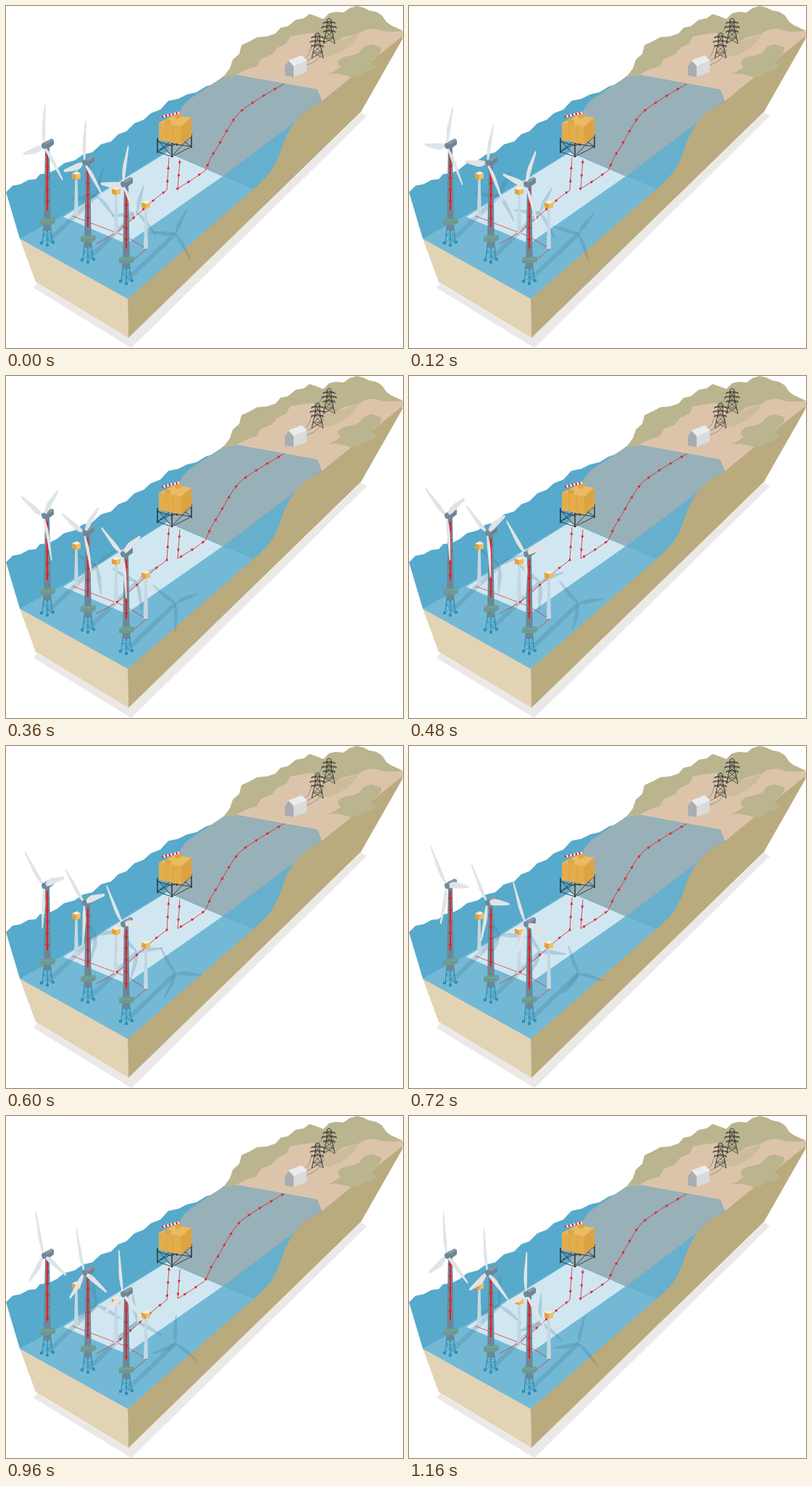
An HTML page with a canvas that plays this animation: 548x472 px, repeating every 1.2 s.

```html
<!DOCTYPE html>
<html lang="en">
<head>
<meta charset="utf-8">
<title>Offshore wind farm</title>
<style>
html, body { margin: 0; width: 100%; height: 100%; overflow: hidden; background: #fff; }
canvas { display: block; }
</style>
</head>
<body>
<canvas id="stage" width="548" height="472"></canvas>
<script>
const stage = document.getElementById('stage');
const ctx = stage.getContext('2d');
const LOOP = 1200, STEP = 120;
const RED = '#e2202c';

function fill(color, d) {
  ctx.fillStyle = color;
  ctx.fill(new Path2D(d));
}

function line(color, width, d) {
  ctx.strokeStyle = color;
  ctx.lineWidth = width;
  ctx.stroke(new Path2D(d));
}

const toPath = points => 'M' + points.join('L');

// Cables that carry moving arrows, in the direction of the current.
const cables = [
  [[152, 313], [165, 302], [188, 282], [206, 266], [222, 254], [225, 209]],
  [[240, 212], [237, 252], [258, 239], [275, 227], [284, 207], [293, 193],
   [303, 175], [314, 157], [322, 147], [332, 139], [352, 126], [384, 107]]
];

const turbines = [
  { x: 52, y: 193, lead: 2 },
  { x: 108, y: 216.5, lead: 2 },
  { x: 161, y: 246, lead: 13 }
];

// Rotor planes: the vectors to 3 o'clock and 12 o'clock.
const ROTOR = { a: [31.8, 19], b: [1, -59.5] };
const SHADOW = { a: [36, 14], b: [8, -38] };

function drawGround() {
  fill('#ebe8e8', 'M43 383L38 389L173 472L498 152L490 147L169 458Z');
  fill('#e3d3b5', 'M19 321L168 404L169 458L41 381Z');
  fill('#b9ab7e', 'M168 404L340 252L400 150L436 131L548 35L547 46L490 146L169 458Z');
}

function drawSea() {
  fill('#57aacb', 'M0 257L9 248L20 246L31 240L41 239L47 232L58 231L70 225L80 217L95 213L106 205' +
    'L119 202L131 191L145 187L155 177L166 173L177 162L190 157L200 148L213 143L224 131L238 128' +
    'L250 122L263 119L276 111L289 107L300 97L320 95L430 115L436 132' +
    'C408 143 392 166 384 186C374 214 368 230 342 252L168 404L19 321Z');
  fill('#73b9d5', 'M19 321L78 289L222 201L300 235L342 252L168 404Z');
  fill('#66b0ce', 'M300 235L395 164L406 151C390 169 383 187 379 200C370 226 362 235 342 252Z');
  fill('#98b0b7', 'M222 201L235 161Q239 139 254 128L281 110L301 97L320 95L430 115L437 131Q414 140 397 162L300 235Z');
  fill('#d0e7f1', 'M79 291L222 202L299 235L166 328Z');
}

function drawLand() {
  fill('#dcc4ab', 'M299 98L330 75L380 45L430 28L490 14L532 27L548 35V41L436 131L430 115L320 95Z');
  // Hills
  fill('#bab58e', 'M300 98L309 86L313 74L322 66L325 54L336 49L347 43L360 42L372 38L379 30L389 28L400 19' +
    'L411 17L419 11L428 14L438 18L446 10L455 8L466 9L474 3L484 0L493 2L501 6L511 8L519 13' +
    'L525 22L532 27L548 34Q526 38 511 32Q498 30 487 38L466 43L455 50L440 47L424 37L408 39' +
    'L392 42L387 52L374 58L367 67L352 73L346 83L331 88L318 95Z');
  fill('#cdbc9c', 'M440 47L455 50L487 38Q478 59 446 70L420 69Z');
  fill('#bab58e', 'M445 94Q455 90 462 84Q452 77 467 70Q478 69 488 64Q494 53 505 53L518 57' +
    'Q519 66 508 72Q499 78 512 83Q505 91 494 91Q485 99 475 98Q459 92 445 94Z');
}

function drawPylon(x, y) {
  const ink = '#2b2b2b';
  line(ink, .9, `M${x - 8} ${y + 35}L${x - 3} ${y + 13}V${y + 2}L${x} ${y}L${x + 3} ${y + 2}` +
    `V${y + 13}L${x + 8} ${y + 35}`);
  line(ink, .6, `M${x - 6} ${y + 27}L${x + 4} ${y + 19}L${x - 3} ${y + 13}L${x + 3} ${y + 4}` +
    `M${x + 6} ${y + 27}L${x - 4} ${y + 19}L${x + 3} ${y + 13}L${x - 3} ${y + 4}` +
    `M${x - 8} ${y + 35}L${x + 6} ${y + 27}H${x - 6}L${x + 8} ${y + 35}`);
  for (const [w, dy] of [[8, 6], [10, 12], [8, 18]])
    line(ink, .8, `M${x - w} ${y + dy + 2}V${y + dy}L${x} ${y + dy - 2}L${x + w} ${y + dy}v2M${x - w} ${y + dy}H${x + w}`);
}

function drawGrid() {
  line('#777', .7, 'M412 73Q420 68 422 52M414 76Q431 70 438 55M414 82Q434 76 438 60' +
    'M421 44Q432 41 438 27M438 44Q449 41 454 27M438 50Q450 47 454 34');
  drawPylon(446, 17);
  drawPylon(430, 37);
  fill('#a9adb1', 'M385 83L390 76L397 82V98L385 96Z');
  fill('#d9dbdd', 'M397 82L415 75V91L397 98Z');
  fill('#ebecee', 'M390 75L408 68L416 75L397 83Z');
}

function drawPlatform() {
  const steel = '#2d3338';
  line(steel, 1.5, 'M209 182V203M229 189V209M256 177V196M236 178V193');
  line(steel, .9, 'M209 185L229 207M229 190L209 201M229 190L256 194M256 179L229 207' +
    'M209 201L229 208L256 194M209 187L229 193L256 181M236 180L209 201M236 180L256 194');
  fill('#e4ad4c', 'M211 161L242 166V191L211 185Z');
  fill('#dca340', 'M242 166L256 154V180L242 191Z');
  fill('#ecba60', 'M211 161L232 151L256 154L242 166Z');
  fill('#dea643', 'M219 162v-4l4 -2l5 2v4l-4 2ZM233 154v-6l4 -2l4 2v6l-4 2Z');
  line('#d39a39', .6, 'M221 163V187M231 165V189');
  line('#fff', 3, 'M215 153L240 147');
  ctx.setLineDash([2.5, 2.5]);
  line(RED, 3, 'M215 153L240 147');
  ctx.setLineDash([]);
}

function drawBuoy(x, y, foot) {
  fill('#c4d8e1', `M${x - 1.5} ${y}H${x + 1.5}L${x + 3} ${foot}H${x - 3}Z`);
  fill('#e3a13a', `M${x - 6} ${y - 2}L${x} ${y}V${y + 7}L${x - 6} ${y + 5}Z`);
  fill('#efbd62', `M${x} ${y}L${x + 6} ${y - 2}V${y + 5}L${x} ${y + 7}Z`);
  fill('#f8edd4', `M${x - 6} ${y - 2}L${x + 1} ${y - 5}L${x + 6} ${y - 2}L${x} ${y}Z`);
}

function arrow(x, y, angle, size) {
  ctx.save();
  ctx.translate(x, y);
  ctx.rotate(angle);
  fill(RED, `M${size} 0L${-size} ${-size * .9}V${size * .9}Z`);
  ctx.restore();
}

// Places arrows at even spacing, counted back from the end of the cable.
function drawArrows(points, phase) {
  let gap = 2 + (2 - phase) * 6;
  for (let i = points.length - 1; i > 0; i--) {
    const [x1, y1] = points[i], [x0, y0] = points[i - 1];
    const dx = x1 - x0, dy = y1 - y0, length = Math.hypot(dx, dy);
    for (; gap < length; gap += 18) {
      const k = gap / length;
      arrow(x1 - dx * k, y1 - dy * k, Math.atan2(dy, dx), 2.2);
    }
    gap -= length;
  }
}

function drawBlades(x, y, plane, degrees, color) {
  const { a, b } = plane;
  for (let i = 0; i < 3; i++) {
    const angle = (degrees + i * 120) * Math.PI / 180;
    const s = Math.sin(angle), c = Math.cos(angle);
    const at = (r, w) => [0, 1].map(k =>
      [x, y][k] + r * (a[k] * s + b[k] * c) + w * (a[k] * c - b[k] * s));
    fill(color, `M${at(.02, -.03)}L${at(.1, -.04)}Q${at(.3, -.12)} ${at(.5, -.09)}L${at(.97, -.03)}` +
      `Q${at(1.02, 0)} ${at(.96, .025)}L${at(.3, .05)}L${at(.02, .03)}Z`);
  }
}

function drawShadow({ x, y, lead }, turn) {
  const color = 'rgba(62,112,140,.22)';
  const foot = [x + 6, y + 132], hub = [x + 73, y + 68];
  line(color, 6, toPath([foot, hub]));
  drawBlades(...hub, SHADOW, turn + lead, color);
}

function drawTurbine({ x, y, lead }, turn, phase) {
  const m = x + 5, deck = y + 105;
  // Jacket foundation
  line('#2b8fb8', 1.3, `M${m - 4} ${deck}L${m - 7} ${deck + 29}M${m + 4} ${deck}L${m + 7} ${deck + 29}M${m} ${deck}V${deck + 32}`);
  line('#2b8fb8', .8, `M${m - 5} ${deck + 7}L${m + 6} ${deck + 18}L${m - 7} ${deck + 29}` +
    `M${m + 5} ${deck + 7}L${m - 6} ${deck + 18}L${m + 7} ${deck + 29}M${m - 6} ${deck + 18}H${m + 6}`);
  fill('#2b8fb8', `M${m - 10} ${deck + 27}h4v4h-4ZM${m + 6} ${deck + 26}h4v4h-4ZM${m - 2} ${deck + 30}h4v4h-4Z`);
  fill('#6e8795', `M${m - 3} ${y + 3}H${m + 3}L${m + 5} ${deck + 12}H${m - 5}Z`);
  fill('#6c9a92', `M${m - 10} ${deck - 3}L${m - 5} ${deck - 5}H${m + 11}V${deck + 1}L${m + 6} ${deck + 4}H${m - 10}Z`);
  line('#87aaa0', .8, `M${m - 10} ${deck - 2}H${m + 6}L${m + 11} ${deck - 4}`);
  line(RED, 2, `M${m} ${y + 7}V${deck - 16}`);
  for (let k = 0; k < 5; k++)
    arrow(m, y + 14 + k * 16 + phase * 5, Math.PI / 2, 2.8);
  // Nacelle
  fill('#6d8595', `M${x + 1} ${y - 5}L${x + 11} ${y - 10}L${x + 14} ${y - 8}V${y - 2}L${x + 6} ${y + 4}L${x} ${y + 4}Z`);
  fill('#879cab', `M${x + 1} ${y - 5}L${x + 11} ${y - 10}L${x + 14} ${y - 8}L${x + 5} ${y - 2}Z`);
  drawBlades(x, y, ROTOR, turn + lead, '#e1e4e6');
  ctx.fillStyle = '#71899a';
  ctx.beginPath();
  ctx.ellipse(x + .5, y, 3.3, 4.3, -.3, 0, 2 * Math.PI);
  ctx.fill();
}

function draw(now) {
  const t = now % LOOP;
  const turn = Math.floor(t / STEP) * 12;
  const phase = Math.floor((t + 40) / 400) % 3;

  ctx.clearRect(0, 0, 548, 472);
  ctx.lineJoin = 'round';
  drawGround();
  drawSea();
  drawLand();
  drawGrid();
  turbines.forEach(turbine => drawShadow(turbine, turn));
  line(RED, .7, 'M92 290L166 318L195 336M125 328L152 313M168 357L193 336');
  drawBuoy(97, 233, 290);
  drawBuoy(152, 254, 314);
  cables.forEach(cable => {
    line(RED, .8, toPath(cable));
    drawArrows(cable, phase);
  });
  drawPlatform();
  drawBuoy(193, 273, 335);
  turbines.forEach(turbine => drawTurbine(turbine, turn, phase));
}

function tick() {
  draw(performance.now());
  requestAnimationFrame(tick);
}
tick();
</script>
</body>
</html>
```
